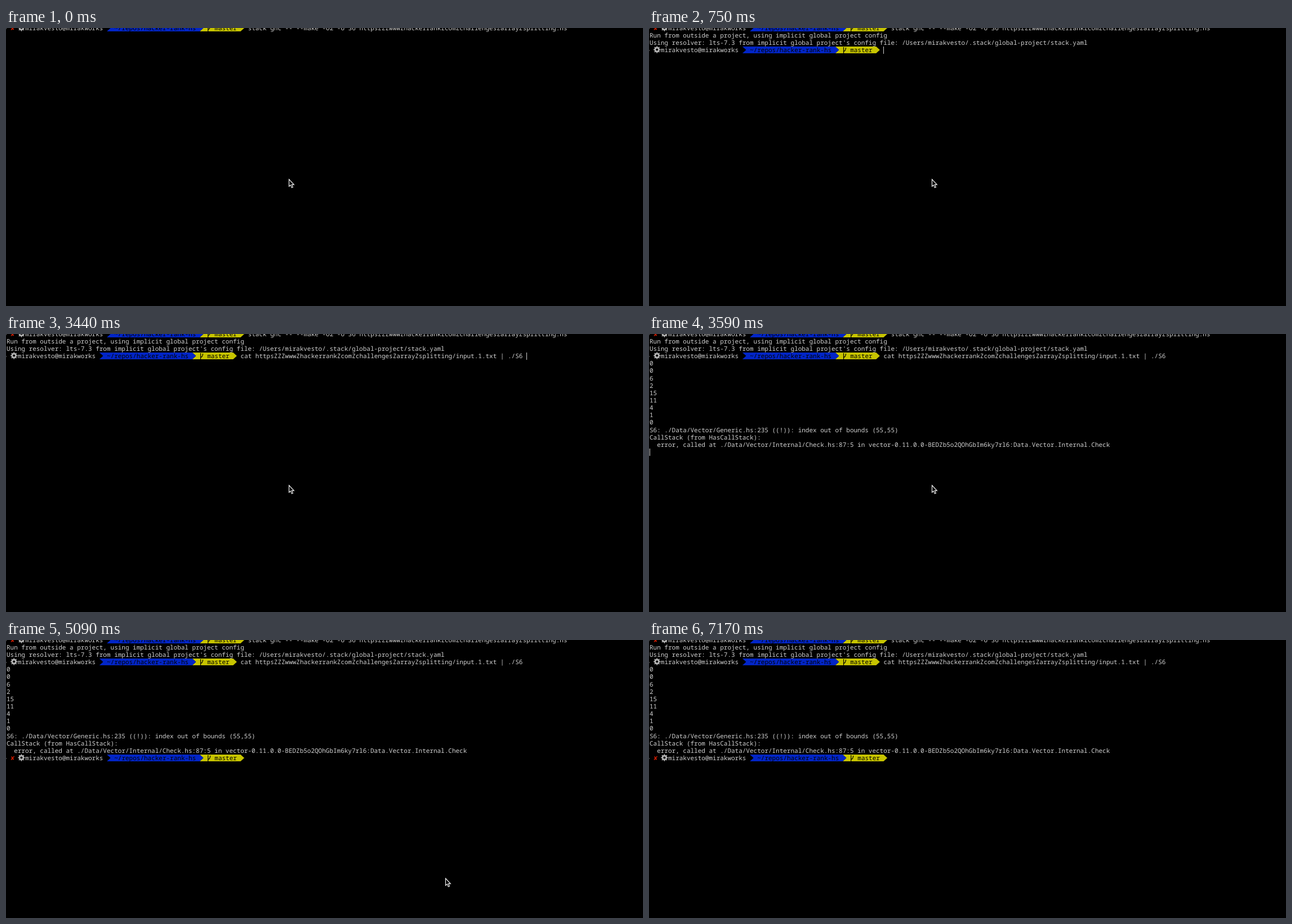
Recreate the animation shown at these times as an HTML page with a canvas. Size 1131 by 495 pixels, loop 7.27 s.

```html
<!DOCTYPE html>
<html lang="en">
<head>
<meta charset="utf-8">
<title>Terminal session</title>
<style>
  html, body { margin: 0; width: 100%; height: 100%; overflow: hidden; background: #000; }
  canvas { display: block; }
</style>
</head>
<body>
<canvas id="stage" width="1131" height="495"></canvas>
<script>
const ctx = document.getElementById('stage').getContext('2d');
ctx.textRendering = 'geometricPrecision';

const LOOP = 7270, CELL = 6.595, ROW = 13, BAR = 12;
const TEXT = '#d0d0d0', GREY = '#b4b4b4', BLUE = '#0225c7', YELLOW = '#c7c400', RED = '#c91b00';
const MONO = `${CELL / 0.6}px "Noto Sans Mono", monospace`;
const USER = 'mirakvesto', HOST = 'mirakworks';
const TASK = 'httpsZZZwwwZhackerrankZcomZchallengesZarrayZsplitting';
const BUILD = `stack ghc -- --make -O2 -o S6 ${TASK}.hs`;
const RUN = `cat ${TASK}/input.1.txt | ./S6 `;
const BUILD_OUTPUT = `Run from outside a project, using implicit global project config
Using resolver: lts-7.3 from implicit global project's config file: /Users/${USER}/.stack/global-project/stack.yaml`;
const RUN_OUTPUT = `0
0
6
2
15
11
4
1
0
S6: ./Data/Vector/Generic.hs:235 ((!)): index out of bounds (55,55)
CallStack (from HasCallStack):
  error, called at ./Data/Vector/Internal/Check.hs:87:5 in vector-0.11.0.0-BEDZb5o2QOhGbIm6ky7rl6:Data.Vector.Internal.Check`;

const colX = col => 1 + col * CELL;
const rowY = row => Math.round(-6.4 + 13.15 * row);

function polygon(color, points) {
  ctx.beginPath();
  points.forEach(([x, y]) => ctx.lineTo(x, y));
  ctx.closePath();
  ctx.fillStyle = color;
  ctx.fill();
}

function write(text, col, row, color = TEXT) {
  ctx.fillStyle = color;
  ctx.font = MONO;
  ctx.fillText(text, colX(col), rowY(row) + 10);
}

// Bar with a notched left end and a pointed right end.
function ribbon(color, from, to, row) {
  const l = colX(from), r = colX(to), y = rowY(row), mid = y + BAR / 2;
  polygon(color, [[l, y], [r, y], [r + CELL, mid], [r, y + BAR], [l, y + BAR], [l + CELL, mid]]);
}

function gear(col, row) {
  const x = colX(col) + 6.6, y = rowY(row) + 5.5;
  ctx.strokeStyle = GREY;
  ctx.lineWidth = 2.8;
  ctx.beginPath();
  ctx.arc(x, y, 3.4, 0, 7);
  ctx.stroke();
  ctx.lineWidth = 1.6;
  ctx.beginPath();
  for (let i = 0; i < 8; i++) {
    const a = i * Math.PI / 4, c = Math.cos(a), s = Math.sin(a);
    ctx.moveTo(x + 4 * c, y + 4 * s);
    ctx.lineTo(x + 6.2 * c, y + 6.2 * s);
  }
  ctx.stroke();
}

function branch(col, row) {
  const x = colX(col) + 1.6, y = rowY(row);
  ctx.strokeStyle = '#000';
  ctx.lineWidth = 1.2;
  ctx.beginPath();
  ctx.moveTo(x, y + 1);
  ctx.lineTo(x, y + 12);
  ctx.moveTo(x, y + 9);
  ctx.quadraticCurveTo(x + 4, y + 7, x + 4, y + 2);
  ctx.stroke();
}

function prompt(row, failed) {
  const shift = failed ? 2 : 0;
  ctx.fillStyle = '#555';
  ctx.fillRect(0, rowY(row) + 6, 1, 2);
  if (failed) {
    ctx.fillStyle = RED;
    ctx.font = '10px "DejaVu Sans", sans-serif';
    ctx.fillText('✘', colX(1), rowY(row) + 10);
  }
  gear(1 + shift, row);
  write(`${USER}@${HOST}`, 3 + shift, row);
  ribbon(YELLOW, 50 + shift, 61 + shift, row);
  ribbon(BLUE, 25 + shift, 50 + shift, row);
  write('~/repos/hacker-rank-hs', 27 + shift, row, '#000');
  branch(52 + shift, row);
  write('master', 54 + shift, row, '#000');
  return [63 + shift, row];
}

function input(text, row) {
  const [col] = prompt(row, false);
  write(text, col, row);
  return [col + text.length, row];
}

function output(text, row) {
  const lines = text.split('\n');
  lines.forEach((line, i) => write(line, 0, row + i));
  return [0, row + lines.length];
}

// Each step draws its part until `until` and returns the caret cell it leaves.
const session = [
  { at: 0, show: () => { prompt(0, true); write(BUILD, 65, 0); } },
  { at: 150, show: () => [0, 1] },
  { at: 300, show: () => output(BUILD_OUTPUT, 1) },
  { at: 750, until: 1350, show: () => prompt(3, false) },
  { at: 1350, until: 1650, show: () => { input(BUILD, 3); } },
  { at: 1650, show: () => input(RUN, 3) },
  { at: 3590, show: () => output(RUN_OUTPUT, 4) },
  { at: 3740, show: () => prompt(16, true) }
];

// The caret stays lit for a while after each change, then blinks.
function caretLit(t, changed) {
  const period = 1080, dark = 480, hold = 1200;
  return t - changed < hold || (t + period - 2850 % period) % period >= dark;
}

// The pointer rests, swings left, sweeps right and glides out at the corner.
const speedUp = u => u ** 3;
const slowDown = u => Math.sin(u * Math.PI / 2);
const path = [
  { n: 0, x: 502, y: 269 },
  { n: 2, x: 17, y: 314, ease: speedUp },
  { n: 4, x: 97, y: 254, ease: speedUp },
  { n: 5, x: 348, y: 259, ease: speedUp },
  { n: 6, x: 780, y: 424, ease: speedUp },
  { n: 11, x: 1129, y: 490, ease: slowDown }
];

// The pointer moves in hard steps, one per sample.
function pointerAt(t) {
  const n = Math.max(0, Math.floor((t - 4192) / 148));
  const i = path.findIndex(p => p.n >= n);
  if (i <= 0) return path[i];
  const a = path[i - 1], b = path[i];
  const k = b.ease((n - a.n) / (b.n - a.n));
  return { x: Math.round(a.x + (b.x - a.x) * k), y: Math.round(a.y + (b.y - a.y) * k) };
}

function pointer({ x, y }) {
  const shape = [[.5, .5], [.5, 13], [3.3, 10.6], [5.3, 15.4], [7.4, 14.5], [5.4, 9.9], [9.3, 9.9]];
  polygon('#000', shape.map(([dx, dy]) => [x + dx, y + dy]));
  ctx.strokeStyle = '#fff';
  ctx.lineWidth = 1.1;
  ctx.stroke();
}

function draw(t) {
  ctx.fillStyle = '#000';
  ctx.fillRect(0, 0, 1131, 495);

  let caret, changed = 0;
  for (const { at, until = LOOP, show } of session) {
    if (t < at || t >= until) continue;
    caret = show();
    changed = at;
  }
  if (caret && caretLit(t, changed)) {
    ctx.fillStyle = TEXT;
    ctx.fillRect(Math.floor(colX(caret[0])), rowY(caret[1]), 1, ROW);
  }
  const spot = pointerAt(t);
  if (spot) pointer(spot);
}

const start = performance.now();
function tick() {
  draw((performance.now() - start) % LOOP);
  requestAnimationFrame(tick);
}
tick();
</script>
</body>
</html>
```
